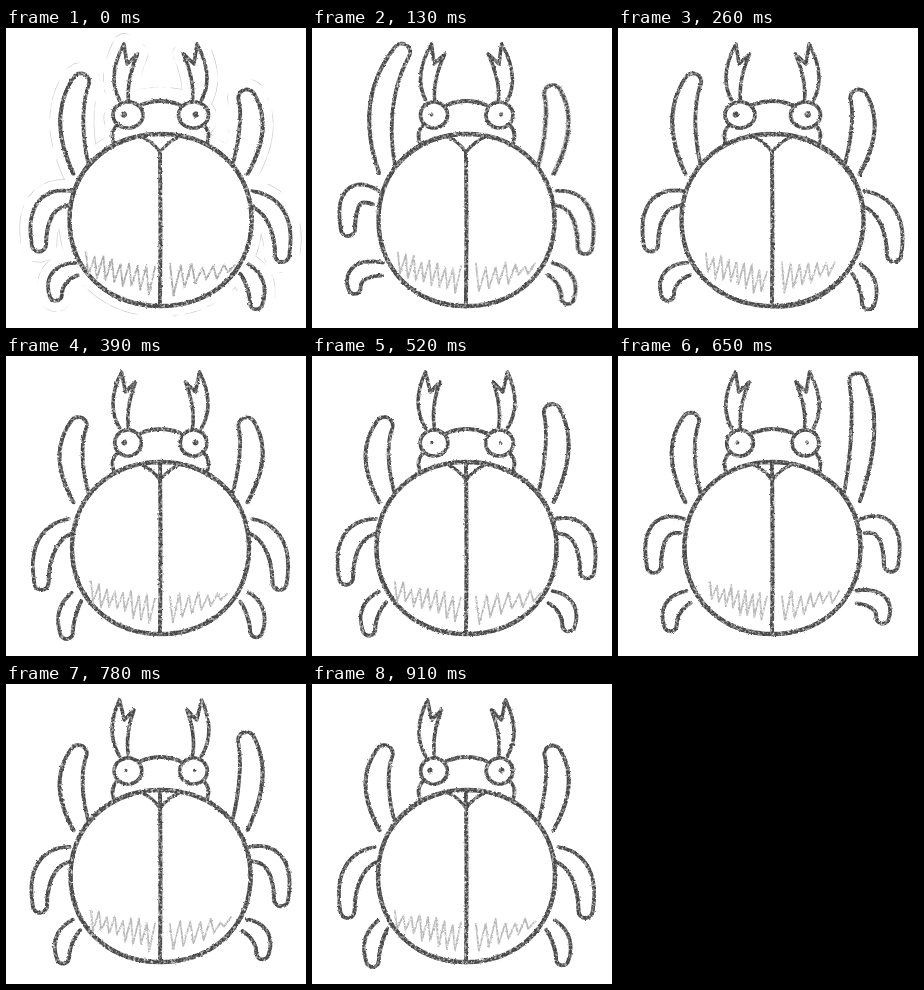
These frames come from a looping animation (300x300 px, 1.04 s). An HTML page:

```html
<!DOCTYPE html>
<html lang="en">
<head>
<meta charset="utf-8">
<title>Pencil beetle</title>
<style>
html, body { margin: 0; width: 100%; height: 100%; overflow: hidden; background: #fff; }
svg { display: block; width: 300px; height: 300px; }
path { fill: none; stroke-linecap: round; stroke-linejoin: round; }
</style>
</head>
<body>
<svg viewBox="0 0 300 300">
  <defs>
    <filter id="pencil" filterUnits="userSpaceOnUse" x="0" y="0" width="300" height="300" color-interpolation-filters="sRGB">
      <feTurbulence id="noise" type="fractalNoise" baseFrequency="0.4" numOctaves="2" result="n"/>
      <feDisplacementMap in="SourceGraphic" in2="n" scale="2.4" xChannelSelector="R" yChannelSelector="G" result="d"/>
      <feColorMatrix in="n" values="0 0 0 0 0  0 0 0 0 0  0 0 0 0 0  0 0 0 2 -0.12" result="g"/>
      <feComposite in="d" in2="g" operator="in"/>
      <feGaussianBlur stdDeviation="0.4"/>
    </filter>
    <filter id="crumble" filterUnits="userSpaceOnUse" x="0" y="0" width="300" height="300">
      <feTurbulence type="fractalNoise" baseFrequency="0.05" numOctaves="3" result="n"/>
      <feColorMatrix in="n" values="0 0 0 0 0  0 0 0 0 0  0 0 0 0 0  0 0 0 9 -4.3" result="g"/>
      <feComposite in="SourceGraphic" in2="g" operator="in"/>
    </filter>
  </defs>
  <g id="rim"></g>
  <g id="ink"></g>
</svg>
<script>
const STEP = 130, INK = '#484848', MID = 154.5, BODY_Y = 192, BODY_RY = 86;
const $ = id => document.getElementById(id);
const mix = (a, b, u) => a + (b - a) * u;

// lift: how far front, middle and back legs are raised, left then right.
// lean: horn tips towards the middle; rx: body half width; seam: top of the wing line.
const rest = { lift: [[.35, .4, .6], [0, 0, .1]], lean: 2.5, rx: 91, eye: 15, pupil: 3.2, seam: 124 };
const leftUp = { lift: [[1, 1, 1], [.1, .3, .4]], lean: 4, rx: 88, eye: 13.5, pupil: 2, seam: 124 };
const rightMid = { lift: [[0, .2, .2], [.3, .45, .45]], lean: -2, rx: 90, eye: 13.8, pupil: 1.7, seam: 108 };
const rightUp = { lift: [[.1, .65, .45], [1, .7, .9]], lean: 2, rx: 88, eye: 13.3, pupil: 2, seam: 108 };
const calm = { lift: [[0, 0, 0], [0, 0, .1]], lean: 0, rx: 88.5, eye: 13.3, pupil: 2.9, seam: 109 };

// Each beat: pose, left and right end of the hatching
const beats = [
  [rest, 79, 228], [leftUp, 85, 222], [rest, 87, 216], [calm, 84, 220],
  [rightMid, 82, 228], [rightUp, 91, 220], [rightMid, 84, 224], [calm, 82, 222]
];

function random(seed) {
  let s = seed * 7919 + 17;
  return () => (s = (s * 16807) % 2147483647) / 2147483647;
}

const line = pts => 'M' + pts.map(p => p.map(v => v.toFixed(1))).join('L');
const path = (d, w = 3.8, extra = '') =>
  `<path d="${d}" stroke="${INK}" stroke-width="${w}" ${extra}/>`;
const mirrored = (draw) => [1, -1].map((side, i) =>
  `<g transform="translate(${MID} 0) scale(${side} 1)">${draw(i)}</g>`).join('');

// Round-ended outline around a bent spine, open at the base
function limb([bx, by], [cx, cy], [tx, ty], half) {
  const cap = half * 0.85, len = Math.hypot(tx - cx, ty - cy);
  const ex = tx - (tx - cx) / len * cap, ey = ty - (ty - cy) / len * cap;
  const out = [], back = [], N = 12;
  let x, y, a;
  for (let i = 0; i <= N; i++) {
    const u = i / N, w = half * (0.85 + 0.3 * Math.sin(Math.PI * u));
    x = mix(mix(bx, cx, u), mix(cx, ex, u), u);
    y = mix(mix(by, cy, u), mix(cy, ey, u), u);
    a = Math.atan2(mix(cy - by, ey - cy, u), mix(cx - bx, ex - cx, u)) + Math.PI / 2;
    out.push([x + w * Math.cos(a), y + w * Math.sin(a)]);
    back.unshift([x - w * Math.cos(a), y - w * Math.sin(a)]);
  }
  for (let k = 1; k < 8; k++) {
    const t = a - Math.PI * k / 8;
    out.push([x + cap * Math.cos(t), y + cap * Math.sin(t)]);
  }
  return out.concat(back);
}

// Legs of one side; x is measured from the middle, outwards is negative
function legs(pose, i) {
  const [f, m, b] = pose.lift[i];
  const front = [i ? -83 : -78 + 18 * f * f, 62 - 45 * f];
  const middle = [-pose.rx - 30, 234 - 26 * m];
  const rear = [-93 - 18 * b, 283 - 17 * b];
  const under = ([x, y], drop) => [x - 4, y - drop];
  return [
    limb([-79, 143], [-98, mix(143, front[1], 0.55)], front, 10),
    limb([-90, 170], under(middle, 55), middle, 8.5),
    limb([-84, 241], under(rear, 27), rear, 7.5)
  ];
}

const horn = pose => `<g transform="translate(0 72) skewX(${-Math.atan(pose.lean / 57) * 180 / Math.PI})">`
  + path('M-41,0Q-55,-24 -39,-56L-35,-36L-25,-46Q-35,-20 -32,0', 3.6) + '</g>';

// Slightly squared oval
function oval(cx, cy, rx, ry, power = 2) {
  const pts = [];
  for (let i = 0; i <= 72; i++) {
    const a = i * Math.PI / 36, c = Math.cos(a), s = Math.sin(a), e = 2 / power;
    pts.push([cx + rx * Math.sign(c) * Math.abs(c) ** e, cy + ry * Math.sign(s) * Math.abs(s) ** e]);
  }
  return line(pts) + 'Z';
}

// Zigzag whose height runs from one end to the other
function hatch(x0, x1, top, low, n, rnd) {
  const pts = [];
  for (let i = 0; i <= 2 * n; i++) {
    const u = i / (2 * n), [a, b] = i % 2 ? low : top;
    pts.push([mix(x0, x1, u) + (i % 2 ? -1 : 1), mix(a, b, u) + 6 * rnd() - 3]);
  }
  return line(pts);
}

function drawing([pose, x0, x1], i) {
  const rnd = random(i + 1), r = pose.pupil, fill = c => `style="fill:${c}"`;
  const shell = oval(MID, BODY_Y, pose.rx, BODY_RY, 2.1);
  const eye = (x, look) => path(oval(x, 87, pose.eye, 13), 3.7)
    + path(oval(x + look * r, 86.5, r, r), 0, fill(INK));
  const shade = hatch(x0, 148, [227, 241], [244, 267], 8, rnd)
    + hatch(163, x1, [238, 236], [268, 243], 6, rnd);
  return mirrored(k => legs(pose, k).map(p =>
      path(line(p)) + path(line(p.slice(18)), 2.2, 'transform="translate(-1 .5)"')).join('')
      + horn(pose) + path('M-44,98Q-50,104 -47,114'))
    + path('M135,77Q154.5,69 174,77')
    + path(shell, 4.4, fill('#fff'))
    + path(shell, 2.4, `transform="rotate(${rnd() * 30 - 15} ${MID} ${BODY_Y}) translate(${rnd() * 2 - 1} .6)"`)
    + path(shade, 1.8, `style="stroke:${i ? '#b6b6b6' : '#a6a6a6'}"`)
    + path('M136,109Q146,113 154,124Q163,113 173,109', 3.2)
    + path(`M154,${pose.seam}Q155,200 154,${BODY_Y + BODY_RY}`, 4)
    + eye(122, -1.3) + eye(187.5, 0.7);
}

// Faint broken cut-out line around the figure
function cutout(pose) {
  const shape = mirrored(k => legs(pose, k).map(p => path(line(p))).join('') + horn(pose))
    + path(oval(MID, BODY_Y, pose.rx, BODY_RY, 2.1)) + path(oval(MID, 90, 46, 20));
  const layer = (w, c) => shape.replace(/stroke="[^"]*" stroke-width="[^"]*"/g,
    `stroke="${c}" stroke-width="${w}" style="fill:${c}"`);
  return `<g filter="url(#crumble)">${layer(22, '#cccccc')}</g>` + layer(20.6, '#fff');
}

let shown = -1;
function render(t) {
  const i = Math.floor(t / STEP) % beats.length;
  if (i === shown) return;
  shown = i;
  $('noise').setAttribute('seed', i + 3);
  $('rim').innerHTML = i ? '' : cutout(rest);
  $('ink').innerHTML = `<g filter="url(#pencil)">${drawing(beats[i], i)}</g>`;
}
function tick() {
  render(performance.now());
  requestAnimationFrame(tick);
}
render(0);
requestAnimationFrame(tick);
</script>
</body>
</html>
```
